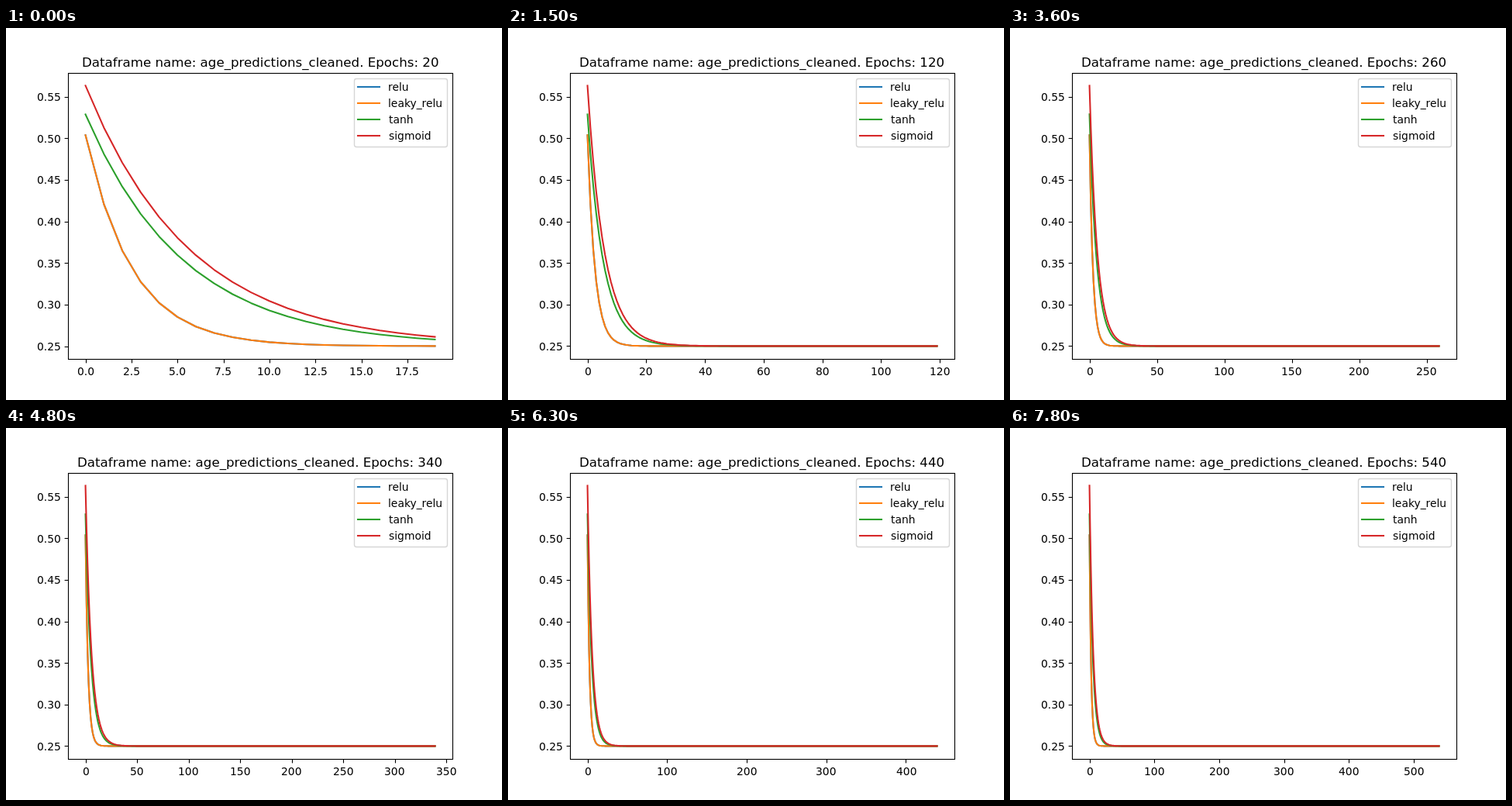
These frames come from a looping animation (640 px wide and 480 px high, 8000 ms). An HTML page with a canvas:

```html
<!DOCTYPE html>
<html lang="en">
<head>
<meta charset="utf-8">
<title>Loss by activation</title>
<style>
  html, body { margin: 0; width: 100%; height: 100%; overflow: hidden; background: #fff; }
  canvas { display: block; }
</style>
</head>
<body>
<canvas id="chart" width="640" height="480"></canvas>
<script>
const ctx = document.getElementById('chart').getContext('2d');
const PT = 100 / 72;
const LEFT = 80, RIGHT = 576, TOP = 57.6, BOTTOM = 427.2;
const FLOOR = 0.25, LOOP = 8000, HOLD = 300;

// Each loss decays geometrically from FLOOR + amp towards FLOOR.
const series = [
  { name: 'relu', color: '#1f77b4', amp: 0.254, rate: 0.673 },
  { name: 'leaky_relu', color: '#ff7f0e', amp: 0.254, rate: 0.673 },
  { name: 'tanh', color: '#2ca02c', amp: 0.279, rate: 0.8295 },
  { name: 'sigmoid', color: '#d62728', amp: 0.3135, rate: 0.8392 }
];
const loss = (s, k) => FLOOR + s.amp * s.rate ** k;
const snap = v => Math.round(v) + 0.5;

function line(points, color, width, cap = 'butt') {
  ctx.beginPath();
  for (const [x, y] of points) ctx.lineTo(x, y);
  ctx.strokeStyle = color;
  ctx.lineWidth = width;
  ctx.lineCap = cap;
  ctx.lineJoin = 'round';
  ctx.stroke();
}

// Aligns by the inked width: 0 left, 0.5 centre, 1 right.
function label(str, x, y, align, points = 10) {
  ctx.font = `${points * PT}px "DejaVu Sans", sans-serif`;
  ctx.fillStyle = '#000';
  const m = ctx.measureText(str);
  const ink = m.actualBoundingBoxLeft + m.actualBoundingBoxRight;
  ctx.fillText(str, Math.round(x - align * ink) + m.actualBoundingBoxLeft, Math.round(y));
}

function tickStep(range) {
  const raw = range / 9;
  const unit = 10 ** Math.floor(Math.log10(raw));
  return [1, 2, 2.5, 5, 10].find(s => s * unit >= raw) * unit;
}

function drawLegend() {
  ctx.beginPath();
  ctx.roundRect(449.5, 65.5, 120, 88, 2.8);
  ctx.fillStyle = 'rgba(255,255,255,.8)';
  ctx.fill();
  ctx.strokeStyle = 'rgba(204,204,204,.8)';
  ctx.lineWidth = PT;
  ctx.stroke();
  series.forEach((s, i) => {
    const y = 76 + 21 * i;
    line([[454, y], [482, y]], s.color, 1.5 * PT, 'square');
    label(s.name, 494, y + 5, 0);
  });
}

function draw(epochs) {
  const last = epochs - 1;
  const low = loss(series[0], last), high = loss(series[3], 0);
  const xOf = k => LEFT + (RIGHT - LEFT) * (k / last + 0.05) / 1.1;
  const yOf = v => BOTTOM - (BOTTOM - TOP) * ((v - low) / (high - low) + 0.05) / 1.1;

  ctx.fillStyle = '#fff';
  ctx.fillRect(0, 0, 640, 480);

  const step = tickStep(1.1 * last);
  for (let v = 0; v <= last * 1.05; v += step) {
    const x = snap(xOf(v));
    line([[x, 427.5], [x, 432.4]], '#000', 0.8 * PT);
    label(v.toFixed(step % 1 ? 1 : 0), xOf(v), 448, 0.5);
  }
  for (let i = 5; i <= 11; i++) {
    const y = yOf(i / 20);
    line([[75.6, snap(y)], [80.5, snap(y)]], '#000', 0.8 * PT);
    label((i / 20).toFixed(2), 70.3, y + 5.4, 1);
  }

  for (const s of series) {
    const points = Array.from({ length: epochs }, (_, k) => [xOf(k), yOf(loss(s, k))]);
    line(points, s.color, 1.5 * PT, 'square');
  }

  ctx.lineWidth = 0.8 * PT;
  ctx.lineJoin = 'miter';
  ctx.strokeStyle = '#000';
  ctx.strokeRect(80.5, 58.5, 496, 369);

  label(`Dataframe name: age_predictions_cleaned. Epochs: ${epochs}`, 328, 50, 0.5, 12);
  drawLegend();
}

function frame() {
  const t = performance.now() % LOOP;
  draw(20 * (1 + Math.floor(t / HOLD)));
  requestAnimationFrame(frame);
}
frame();
</script>
</body>
</html>
```
